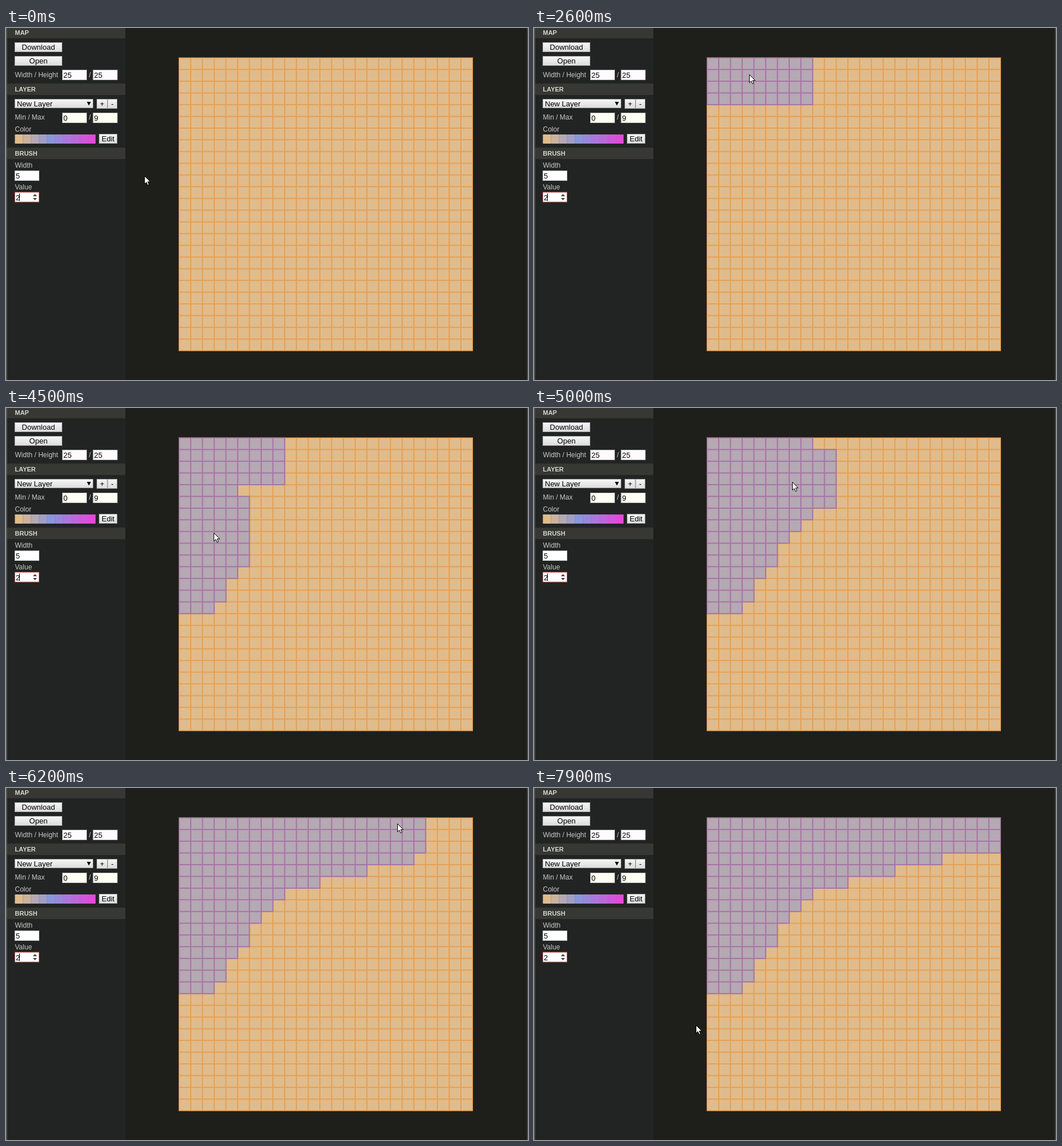
An HTML page that plays this animation: 910 by 615 pixels, repeating every 8000 ms.

```html
<!DOCTYPE html>
<html lang="en">
<head>
<meta charset="utf-8">
<title>Map editor</title>
<style>
html, body { margin: 0; width: 100%; height: 100%; overflow: hidden; background: #1e1f1a; }
svg { display: block; font-family: "Liberation Sans", Arial, sans-serif; }
</style>
</head>
<body>
<svg id="stage" width="910" height="615" viewBox="0 0 910 615">
  <defs>
    <linearGradient id="face" x1="0" y1="0" x2="0" y2="1">
      <stop offset="0" stop-color="#f6f6f6"/><stop offset="1" stop-color="#dcdcdc"/>
    </linearGradient>
    <clipPath id="board"><rect x="301" y="51.5" width="513" height="513"/></clipPath>
  </defs>
  <rect width="910" height="615" fill="#1e1f1a"/>
  <rect width="208" height="615" fill="#222424"/>
  <g id="panel"></g>
  <rect width="2" height="615" fill="#55554d"/>
  <rect x="908" width="2" height="615" fill="#45453f"/>
  <g clip-path="url(#board)" stroke-width="2">
    <path id="ground" fill="#e0bc8c" stroke="#e5a055"/>
    <path id="paint" fill="#b5a9b3" stroke="#a674a5"/>
  </g>
  <rect id="caret" x="23" y="289" width="1" height="13" fill="#000"/>
  <path id="cursor" d="M.5 .5V14.6L3.7 11.6L5.9 16.6L8.3 15.6L6.1 10.7H10.6Z" fill="#fff" stroke="#000"/>
</svg>
<script>
const LOOP = 8000, STEP = 100, CELLS = 25, SIZE = 20.48, LEFT = 301.5, TOP = 52;
const PRESS = 2000, RELEASE = 7300, LEAD = 50, BRUSH = 2;
const $ = id => document.getElementById(id);

function add(tag, attrs, text) {
  const el = document.createElementNS("http://www.w3.org/2000/svg", tag);
  for (const key in attrs) el.setAttribute(key, attrs[key]);
  if (text) el.textContent = text;
  $("panel").append(el);
}
const box = (x, y, width, height, fill, more) => add("rect", { x, y, width, height, fill, ...more });
const label = (x, y, text, size = 12, fill = "#c9c9c4", more) =>
  add("text", { x, y, "font-size": size, fill, ...more }, text);

function header(y, height, text) {
  box(0, y, 208, height, "#373733");
  label(15.5, y + height - 6, text, 11, "#d6d6d0", { "font-weight": "bold" });
}
function button(x, y, width, text) {
  box(x + .5, y + .5, width - 1, 16, "url(#face)", { stroke: "#a9a9a5" });
  label(x + width / 2, y + 13, text, 13, "#000", { "text-anchor": "middle" });
}
function field(x, y, text, fill = "#fff", stroke = "#c2c2bc") {
  box(x + .5, y + .5, 42, 17, fill, { stroke });
  label(x + 2, y + 14, text, 13, "#000");
}
function drawPanel() {
  header(0, 18, "MAP");
  button(15, 25, 83, "Download");
  button(15, 49, 83, "Open");
  label(15.5, 86, "Width / Height");
  field(98, 73, "25", "#fffaff");
  label(144.5, 86, "/");
  field(151.5, 73, "25", "#fffaff");

  header(97, 20, "LAYER");
  box(15.5, 124.5, 136, 15, "url(#face)", { stroke: "#a9a9a5" });
  label(19, 137, "New Layer", 13, "#000");
  add("path", { d: "M141 129h7l-3.5 6.5z", fill: "#000" });
  button(158, 124, 19, "+");
  button(177, 124, 17, "-");
  label(15.5, 160, "Min / Max");
  field(98, 148, "0", "#fffff4");
  label(144.5, 160, "/");
  field(151.5, 148, "9", "#fffff4");
  label(15.5, 181, "Color");
  ["#e0bc8c", "#cab29f", "#b5a9b3", "#9f9fc7", "#8a96da", "#9a87da",
    "#ab78da", "#bc68da", "#cd59da", "#e24ada"].forEach((color, i) =>
    box(15.5 + i * 14.05, 186, 14.2, 16, color));
  button(162, 185, 32, "Edit");

  header(209, 20, "BRUSH");
  label(15.5, 244, "Width");
  field(15, 249, "5");
  label(15.5, 282, "Value");
  field(15, 286.5, "2", "#fff", "#c8604c");
  add("path", { d: "M47 294l3.5-4 3.5 4zM47 297l3.5 4 3.5-4z", fill: "#444" });
}

// Pointer keys: time in units of 100 ms, x, y
const track = [
  [5, 241, 258], [8, 283, 233], [9, 283, 233], [14, 448, 88], [16, 448, 88],
  [18, 440, 86], [19, 440, 86], [22, 433, 86], [23, 433, 86], [24, 420, 85],
  [26, 375, 81], [27, 347, 84], [30, 343, 122], [32, 336, 201], [34, 324, 246],
  [35, 315, 264], [36, 308, 279], [38, 303, 300], [39, 295, 306], [40, 294, 304],
  [41, 294, 304], [42, 306, 296], [43, 325, 283], [44, 342, 254], [45, 362, 218],
  [46, 375, 203], [47, 391, 184], [49, 430, 146], [50, 450, 129], [51, 487, 117],
  [52, 505, 112], [55, 554, 98], [56, 573, 96], [57, 590, 91], [59, 630, 80],
  [61, 667, 71], [62, 682, 62], [64, 708, 47], [66, 745, 38], [68, 773, 38],
  [72, 771, 53], [74, 771, 53], [79, 282, 414]
];
function pointer(time) {
  const t = time / 100;
  const i = track.findIndex(key => key[0] >= t);
  if (i < 0) return track[track.length - 1].slice(1);
  if (i === 0) return track[0].slice(1);
  const [t0, x0, y0] = track[i - 1], [t1, x1, y1] = track[i];
  const k = (t - t0) / (t1 - t0);
  return [x0 + (x1 - x0) * k, y0 + (y1 - y0) * k];
}

// Time at which the square brush first reaches each cell
function strokeTimes() {
  const times = new Map();
  for (let time = PRESS; time < RELEASE; time += 5) {
    const [x, y] = pointer(time);
    const col = Math.floor((x - LEFT) / SIZE), row = Math.floor((y - TOP) / SIZE);
    if (col < 0 || row < 0) continue;
    for (let r = Math.max(0, row - BRUSH); r <= row + BRUSH; r++)
      for (let c = Math.max(0, col - BRUSH); c <= Math.min(CELLS - 1, col + BRUSH); c++) {
        const cell = r * CELLS + c;
        if (!times.has(cell)) times.set(cell, time);
      }
  }
  return [...times];
}
const cellPath = cell => {
  const x = LEFT + cell % CELLS * SIZE, y = TOP + Math.floor(cell / CELLS) * SIZE;
  return `M${x.toFixed(2)} ${y.toFixed(2)}h${SIZE}v${SIZE}h-${SIZE}z`;
};

drawPanel();
$("ground").setAttribute("d", Array.from({ length: CELLS * CELLS }, (_, i) => cellPath(i)).join(""));
const strokes = strokeTimes();

function caretOn(time) {
  return time < 2400 ? Math.floor(time / 600) % 2 === 0 : time < 7700;
}
function render(time) {
  const t = Math.floor(time / STEP) * STEP;
  const [x, y] = pointer(t);
  $("cursor").setAttribute("transform", `translate(${Math.round(x)} ${Math.round(y)})`);
  $("caret").setAttribute("visibility", caretOn(t) ? "visible" : "hidden");
  $("paint").setAttribute("d", strokes.filter(s => t >= PRESS && s[1] <= t + LEAD)
    .map(s => cellPath(s[0])).join(""));
}
const start = performance.now();
function tick() {
  render((performance.now() - start) % LOOP);
  requestAnimationFrame(tick);
}
render(0);
requestAnimationFrame(tick);
</script>
</body>
</html>
```
